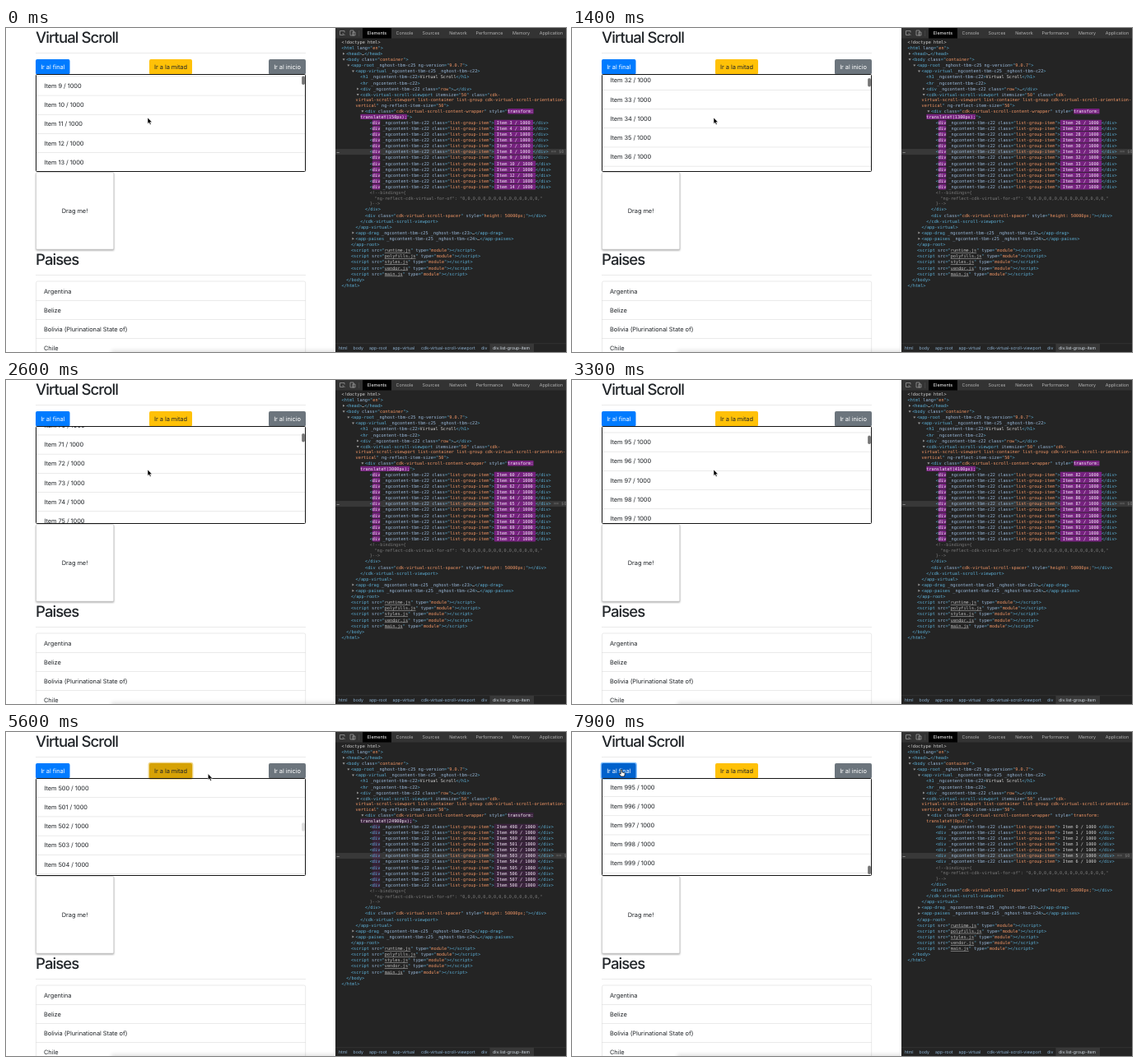
Animation, 680 px wide and 394 px high, one loop 8 s. Source, as an HTML page:

```html
<!DOCTYPE html>
<html lang="en">
<head>
<meta charset="utf-8">
<title>Virtual Scroll</title>
<style>
  html, body { margin: 0; width: 100%; height: 100%; overflow: hidden; background: #fff; }
  svg { display: block; width: 680px; height: 394px; }
  text { white-space: pre; text-rendering: geometricPrecision; }
  .ui { font: 7.42px Inter, Roboto, sans-serif; letter-spacing: -.05px; fill: #212529; }
  .head { font: 500 18.56px Inter, Roboto, sans-serif; letter-spacing: -.05em; fill: #212529; }
  .tab { font: 5.4px Inter, Roboto, sans-serif; fill: #b4b4b4; }
  .crumb { font: 5.2px Inter, Roboto, sans-serif; fill: #8fb4d4; }
  .code { font: 5.23px "DejaVu Sans Mono", "Liberation Mono", monospace; fill: #5db0d7; }
  .a { fill: #9bbbdc; }
  .v { fill: #f29766; }
  .p { fill: #d4d4d4; }
  .c { fill: #7b7b7b; }
  .u { fill: #bdbdbd; text-decoration: underline; }
</style>
</head>
<body>
<svg viewBox="0 0 680 394" xmlns="http://www.w3.org/2000/svg">
  <defs>
    <clipPath id="listClip"><rect x="37" y="57" width="326.5" height="117"/></clipPath>
    <filter id="blur" x="-10%" y="-10%" width="120%" height="120%"><feGaussianBlur stdDeviation="1"/></filter>
    <filter id="haze" x="-20%" y="-20%" width="140%" height="140%"><feGaussianBlur stdDeviation="2.5"/></filter>
  </defs>
  <rect width="680" height="394" fill="#fff"/>
  <g id="page"></g>
  <g id="buttons"></g>
  <g id="list" clip-path="url(#listClip)"></g>
  <rect x="36.5" y="56.5" width="327" height="118" rx="1" fill="none" stroke="#151515"/>
  <rect id="thumb" x="359.2" width="3.6" height="10.5" rx="1.8" fill="#727272"/>
  <rect x="400" width="280" height="394" fill="#242424"/>
  <g id="chrome"></g>
  <g id="tree"></g>
  <g id="tail"></g>
  <g id="arrow"><path d="M0 0V7.4L1.7 5.9L2.9 8.6L4.2 8L3 5.4H5.3Z" fill="#000" stroke="#fff" stroke-width=".5"/></g>
  <g id="hand"><path d="M-.8 0Q0-1 .8 0V3L3.6 3.6Q4.4 4 4.2 5.2L3.6 8H-.6L-2.9 4.8Q-2.6 3.8-1.7 4.4L-.8 5.2Z" fill="#fff" stroke="#000" stroke-width=".7"/></g>
</svg>
<script>
const LOOP = 8000, STEP = 100, ROW = 23.2, LINE = 7.11, WRAP = 6.6, CHAR = 5.23 * .602;
const TREE_TOP = 115;
const $ = id => document.getElementById(id);
const clamp = x => Math.max(0, Math.min(1, x));

// Value at time t along [time, ...values] keys
function along(keys, t, n = 1) {
  let i = 0;
  while (i < keys.length - 2 && t >= keys[i + 1][0]) i++;
  const a = keys[i], b = keys[i + 1], k = clamp((t - a[0]) / (b[0] - a[0]));
  return a[n] + (b[n] - a[n]) * k;
}

const text = (cls, x, y, s, extra = '') => `<text class="${cls}" x="${x}" y="${y}" ${extra}>${s}</text>`;
const box = (x, y, w, h, fill, extra = '') =>
  `<rect x="${x}" y="${y}" width="${w}" height="${h}" fill="${fill}" ${extra}/>`;
const rule = (y, x = 36, w = 328) => box(x, y, w, .6, '#dcdcdc');
const span = (cls, s) => `<tspan class="${cls}">${s}</tspan>`;
const attr = (name, value) => ' ' + span('a', name) + (value === undefined ? '' : `="${span('v', value)}"`);
const open = (name, attrs = '') => `&lt;${name}${attrs}&gt;`;
const close = name => `&lt;/${name}&gt;`;
const folded = (name, attrs = '') => open(name, attrs) + span('p', '…') + close(name);
const code = (x, y, s) => text('code', x, y + 1.8, s);
const indent = depth => 407.5 + depth * 5.7;
function caret(depth, y, isOpen) {
  const x = indent(depth) - 4.6;
  const d = isOpen ? `M${x} ${y - 1}h3l-1.5 2.4z` : `M${x + .4} ${y - 1.5}v3l2.4-1.5z`;
  return `<path d="${d}" fill="#999"/>`;
}

// Rows: [depth, markup, caret ('o' open, 'f' folded), line advance]
function lines(rows, y) {
  return rows.map(([depth, s, mark, advance = LINE]) => {
    const out = code(indent(depth), y, s) + (mark ? caret(depth, y, mark === 'o') : '');
    y += advance;
    return out;
  }).join('');
}

const own = attr('_ngcontent-tbm-c22'), root = attr('_ngcontent-tbm-c25');

function drawPage() {
  const countries = ['Argentina', 'Belize', 'Bolivia (Plurinational State of)', 'Chile'];
  $('page').innerHTML =
    text('head', 36, 18.2, 'Virtual Scroll') + rule(30) +
    box(36.5, 177, 94.5, 93.4, '#000', 'opacity=".4" filter="url(#blur)"') +
    box(36.5, 175.6, 94.3, 93.6, '#fff', 'rx="1.5" stroke="#c4c4c4" stroke-width=".6"') +
    text('ui', 83.5, 225.2, 'Drag me!', 'text-anchor="middle"') +
    text('head', 36, 288, 'Paises') + rule(300) +
    box(36.5, 308, 327.2, 100, '#fff', 'rx="2" stroke="#dcdcdc" stroke-width=".6"') +
    countries.map((name, i) => text('ui', 46, 322.5 + i * ROW, name) + rule(331 + i * ROW)).join('') +
    box(128, 392, 300, 60, '#000', 'opacity=".12" filter="url(#haze)"');
}

function drawChrome() {
  const tabs = { Elements: 450.5, Console: 484, Sources: 516, Network: 549, Performance: 587, Memory: 625.5, Application: 662 };
  const crumbs = { html: 404, body: 421.5, 'app-root': 441, 'app-virtual': 469.5, 'cdk-virtual-scroll-viewport': 504, div: 577, 'div.list-group-item': 591 };
  const tabText = Object.entries(tabs).map(([s, x], i) =>
    text('tab', x, 8, s, `text-anchor="middle"${i ? '' : ' style="fill:#fff"'}`)).join('');
  const crumbText = Object.entries(crumbs).map(([s, x]) =>
    text('crumb', x, 390.5, s, x > 590 ? 'style="fill:#d5dfe8"' : '')).join('');
  $('chrome').innerHTML =
    box(400, 0, 280, 12.6, '#333') + box(433, 0, 35, 12.6, '#000') +
    '<path d="M410 8.5h-4.5v-5h5.5v2M408.5 6l3 3M418 3h4v6h-4zM421 5h3v4h-3z" fill="none" stroke="#a5a5a5" stroke-width=".7"/>' +
    '<path d="M428.7 3v7" stroke="#555" stroke-width=".5"/>' + tabText +
    box(400, 383.6, 280, .5, '#3d3d3d') + box(587.5, 384, 53.5, 10, '#383838') + crumbText +
    lines([
      [0, span('p', '&lt;!doctype html&gt;')],
      [0, open('html', attr('lang', 'en'))],
      [1, folded('head'), 'f'],
      [1, open('body', attr('class', 'container')), 'o'],
      [2, open('app-root', attr('_nghost-tbm-c25') + attr('ng-version', '9.0.7')), 'o'],
      [3, open('app-virtual', root + attr('_nghost-tbm-c22')), 'o'],
      [4, open('h1', own) + span('p', 'Virtual Scroll') + close('h1')],
      [4, open('hr', own)],
      [4, folded('div', own + attr('class', 'row')), 'f'],
      [4, '&lt;cdk-virtual-scroll-viewport' + attr('itemsize', '50') + ' ' + span('a', 'class') + '="' + span('v', 'cdk-'), 'o', WRAP],
      [3, span('v', 'virtual-scroll-viewport list-container list-group cdk-virtual-scroll-orientation-'), '', WRAP],
      [3, span('v', 'vertical') + '"' + attr('ng-reflect-item-size', '50') + '&gt;']
    ], 17);

  const script = name => [2, open('script', ` ${span('a', 'src')}="${span('u', name + '.js')}"` + attr('type', 'module')) + close('script')];
  $('tail').innerHTML = lines([
    [6, span('c', '&lt;!--bindings={'), '', WRAP],
    [7, span('c', '"ng-reflect-cdk-virtual-for-of": "' + '0,'.repeat(15) + '"'), '', WRAP],
    [6, span('c', '}--&gt;')],
    [5, close('div')],
    [5, open('div', attr('class', 'cdk-virtual-scroll-spacer') + attr('style', 'height: 50000px;')) + close('div')],
    [4, close('cdk-virtual-scroll-viewport')],
    [3, close('app-virtual')],
    [3, folded('app-drag', root + attr('_nghost-tbm-c23')), 'f'],
    [3, folded('app-paises', root + attr('_nghost-tbm-c24')), 'f'],
    [2, close('app-root')],
    ...['runtime', 'polyfills', 'styles', 'vendor', 'main'].map(script),
    [1, close('body')],
    [0, close('html')]
  ], TREE_TOP);
}

const scrollKeys = [[0, 8.92], [800, 14.53], [2000, 49.89], [3300, 94.7], [4200, 61.49], [4500, 52]];
const startKeys = [[0, 3], [800, 9], [2000, 42], [3300, 82], [4200, 59], [4600, 48]];
const jumps = { middle: 4900, top: 6400, end: 7800 };

function scrollAt(t) {
  if (t >= jumps.end) return { pos: 995.07, since: jumps.end };
  if (t >= jumps.top) return { pos: 0, since: jumps.top };
  if (t >= jumps.middle) return { pos: 500.02, since: jumps.middle };
  return { pos: along(scrollKeys, t), since: Math.min(t, 4500) };
}

// The inspector follows the list a little later
function renderedAt(t) {
  if (t >= jumps.top + 100) return { start: 0, count: 7, since: jumps.top + 100 };
  if (t >= jumps.middle + 100) return { start: 498, count: 11, since: jumps.middle + 100 };
  return { start: Math.round(along(startKeys, t)), count: 12, since: Math.min(t, 4600) };
}

function drawList(t) {
  const { pos, since } = scrollAt(t);
  let out = '';
  for (let i = Math.max(0, Math.floor(pos) - 1); i < Math.min(1000, pos + 7); i++) {
    const y = 57 + (i - pos) * ROW;
    out += text('ui', 46.4, y + 14.2, `Item ${i} / 1000`) + rule(y + ROW - .3);
  }
  $('list').innerHTML = out;
  $('thumb').setAttribute('y', 57.6 + pos / 995 * 105);
  $('thumb').setAttribute('opacity', clamp(1 - (t - since - 400) / 400));
}

function drawTree(t) {
  const { start, count, since } = renderedAt(t);
  const glow = Math.pow(1 - clamp((t - since) / 1400), 2.3);
  const mark = (x, y, n) => box(x, y - 3.2, n * CHAR, 6.4, '#76227f', `rx=".8" opacity="${glow}"`);
  const litAbove = level => glow > level ? 'style="fill:#f4ecf5"' : '';
  const lit = litAbove(.1);
  const shift = `translateY(${start * 50}px);`;
  const wrapY = TREE_TOP - LINE, styleY = wrapY - WRAP;
  const x5 = indent(5), x6 = indent(6);

  let out = mark(x5 + 55 * CHAR, styleY, 10) + mark(indent(4), wrapY, shift.length) +
    caret(5, styleY, true) +
    code(x5, styleY, '&lt;div' + attr('class', 'cdk-virtual-scroll-content-wrapper') + ' ' + span('a', 'style') + `="<tspan class="v" ${lit}>transform:</tspan>`) +
    code(indent(4), wrapY, `<tspan class="v" ${lit}>${shift}</tspan>"&gt;`);

  for (let i = 0; i < count; i++) {
    const y = TREE_TOP + i * LINE, label = ` Item ${start + i} / 1000 `;
    if (i === 5) out += box(400, y - 3.5, 280, 7, '#383838') + text('code', 401.5, y + 1, span('p', '…'));
    out += mark(x6 + CHAR, y, 3) + mark(x6 + 48 * CHAR, y, label.length) +
      code(x6, y, `&lt;<tspan ${litAbove(.5)}>div</tspan>${own}${attr('class', 'list-group-item')}&gt;` +
        `<tspan class="p" ${lit}>${label}</tspan>${close('div')}` + (i === 5 ? span('c', ' == $0') : ''));
  }
  $('tree').innerHTML = out;
  $('tail').setAttribute('transform', `translate(0 ${count * LINE})`);
}

const buttons = [
  { label: 'Ir al final', x: 36, w: 41.5, fill: '#007bff', dark: '#0062cc', ink: '#fff', ring: '#80bfff', hover: [7600, 8000], focus: [jumps.end, 8000] },
  { label: 'Ir a la mitad', x: 174, w: 52, fill: '#ffc107', dark: '#d6a206', ink: '#212529', ring: '#eed485', hover: [4800, 5700], focus: [jumps.middle, jumps.top] },
  { label: 'Ir al inicio', x: 319, w: 45, fill: '#6c757d', dark: '#545b62', ink: '#fff', ring: '#c0c4c8', hover: [6100, 7200], focus: [jumps.top, jumps.end] }
];

function drawButtons(t) {
  const during = ([from, to]) => t >= from && t < to;
  $('buttons').innerHTML = buttons.map(b =>
    (during(b.focus) ? box(b.x - 1.4, 36.8, b.w + 2.8, 21, b.ring, 'rx="3"') : '') +
    box(b.x, 38.1, b.w, 18.3, during(b.hover) ? b.dark : b.fill, 'rx="1.9"') +
    text('ui', b.x + b.w / 2, 50, b.label, `text-anchor="middle" style="fill:${b.ink}"`)).join('');
}

const cursorKeys = [
  [0, 172, 109], [4500, 172, 109], [4800, 199, 47], [5400, 206, 47], [5600, 245.3, 50.8],
  [6100, 338, 47], [7100, 338, 47], [7650, 60, 46], [8000, 60, 46]
];

function drawCursor(t) {
  const x = along(cursorKeys, t, 1), y = along(cursorKeys, t, 2);
  const over = y < 56 && buttons.some(b => x >= b.x && x <= b.x + b.w);
  for (const [id, shown] of [['arrow', !over], ['hand', over]]) {
    $(id).setAttribute('transform', `translate(${x} ${y})`);
    $(id).setAttribute('visibility', shown ? 'visible' : 'hidden');
  }
}

let shownAt = -1;
function render(now) {
  const t = Math.floor(now % LOOP / STEP) * STEP;
  if (t !== shownAt) {
    shownAt = t;
    drawButtons(t);
    drawList(t);
    drawTree(t);
    drawCursor(t);
  }
}

drawPage();
drawChrome();
render(0);
const began = performance.now();
(function tick() {
  render(performance.now() - began);
  requestAnimationFrame(tick);
})();
</script>
</body>
</html>
```
